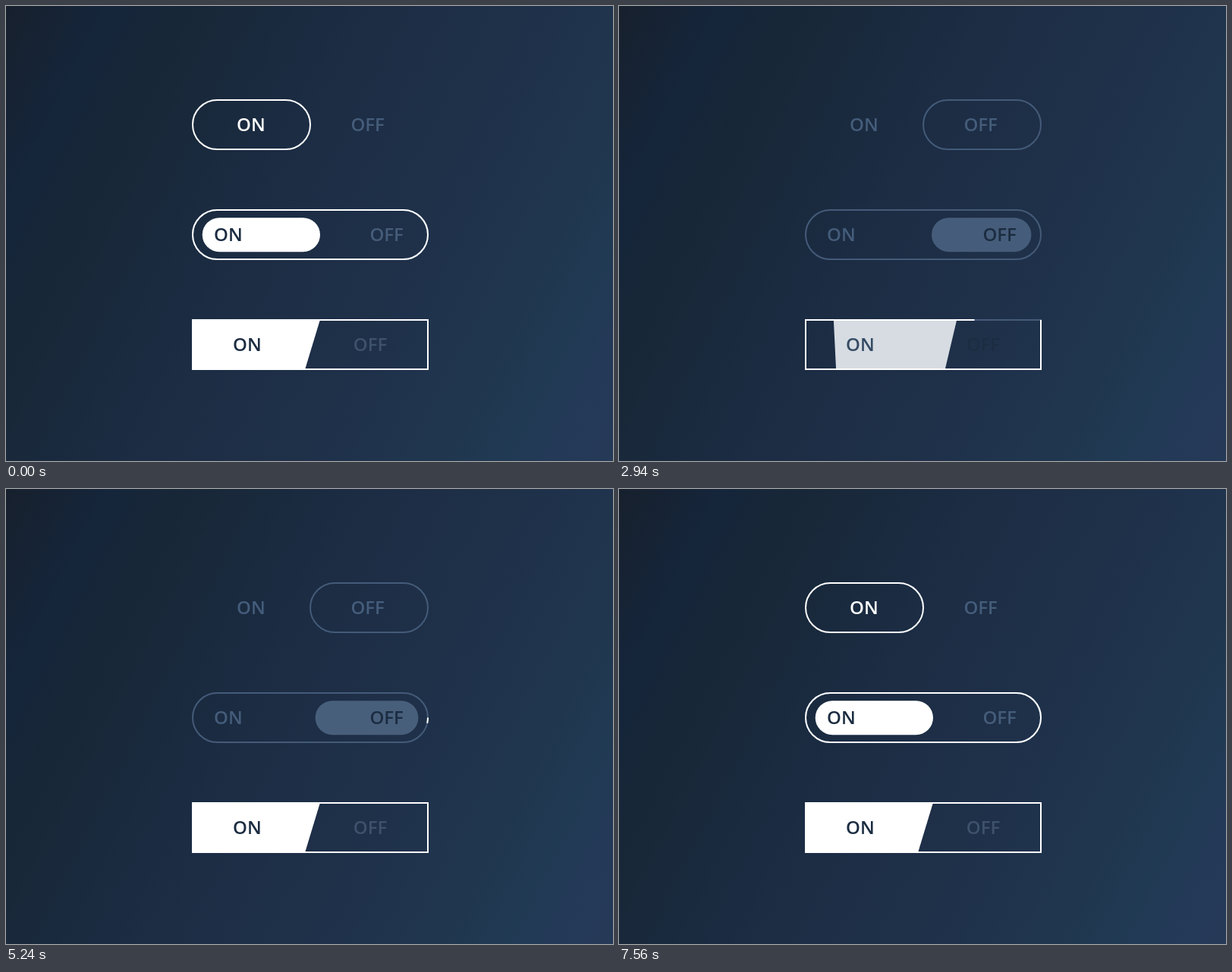
An HTML page for the animation above (7.62 s loop, 800 by 600 pixels).

```html
<!DOCTYPE html>
<html lang="en">
<head>
<meta charset="utf-8">
<title>Toggles</title>
<style>
  html, body { margin: 0; width: 100%; height: 100%; overflow: hidden; }
  body {
    background: linear-gradient(116.6deg, #17202d 0%, #15253a 12%, #182737 22%,
      #1b2c43 42%, #1f3049 62%, #20364f 80%, #213a53 87%, #233957 92%, #263a58 100%);
  }
  svg { display: block; width: 800px; height: 600px; }
  .ring { fill: none; stroke-width: 2; }
  .dim { stroke: #445b79; }
  .lit { stroke: #fff; }
  text { font: 600 24px "Open Sans", "Noto Sans", sans-serif; text-anchor: middle; }
</style>
</head>
<body>
<svg id="stage" viewBox="0 0 800 600"></svg>
<script>
const LOOP = 7620;
const WHITE = [255, 255, 255], DIM = [69, 93, 122], DARK = [27, 44, 65], FAINT = [62, 82, 109];
const stage = document.getElementById('stage');

function add(tag, attrs, content) {
  const node = document.createElementNS('http://www.w3.org/2000/svg', tag);
  for (const key in attrs) node.setAttribute(key, attrs[key]);
  if (content) node.textContent = content;
  return stage.appendChild(node);
}

function bezier(x1, y1, x2, y2) {
  const at = (a, b, u) => 3 * (1 - u) * (1 - u) * u * a + 3 * (1 - u) * u * u * b + u * u * u;
  return x => {
    if (x <= 0) return 0;
    if (x >= 1) return 1;
    let lo = 0, hi = 1;
    for (let i = 0; i < 24; i++) {
      const mid = (lo + hi) / 2;
      if (at(x1, x2, mid) < x) lo = mid; else hi = mid;
    }
    return at(y1, y2, lo);
  };
}

const soft = bezier(.33, 0, .3, 1);
const even = bezier(.33, 0, .67, 1);
const quick = bezier(.2, 0, .2, 1);
const burst = bezier(.05, .35, .3, 1);

// Each track goes 0 -> 1 (off), then back to 0 (on): start, duration, easing.
const tracks = {
  ring1:  [[400, 1090, soft], [6330, 1230, even]],
  on1:    [[420, 800, soft], [6400, 900, even]],
  ring2:  [[1715, 1110, soft], [5194, 837, soft]],
  right2: [[1502, 1110, soft], [5400, 517, soft]],
  left2:  [[1970, 740, soft], [5194, 520, soft]],
  fill2:  [[1627, 1110, soft], [5194, 700, soft]],
  on2:    [[1520, 560, soft], [5300, 450, soft]],
  off2:   [[1950, 720, soft], [5230, 450, soft]],
  ring3:  [[2747, 1126, soft], [4210, 950, quick]],
  move3:  [[2745, 850, soft], [4210, 950, burst]],
  fill3:  [[2745, 850, soft], [4210, 900, quick]],
  on3:    [[2730, 500, soft], [4210, 230, soft]],
  off3:   [[2640, 360, soft], [4210, 345, soft]]
};

const value = (name, t) => {
  const [a, b] = tracks[name].map(([start, dur, ease]) => ease((t - start) / dur));
  return a - b;
};
const mix = (a, b, p) => a + (b - a) * p;
const color = (a, b, p) => `rgb(${a.map((v, i) => Math.round(mix(v, b[i], p)))})`;

function capsule(x, y, w) {
  const r = 32.5;
  return `M${x + w} ${y + r}a${r} ${r} 0 0 1 ${-r} ${r}h${2 * r - w}` +
    `a${r} ${r} 0 0 1 0 ${-2 * r}h${w - 2 * r}a${r} ${r} 0 0 1 ${r} ${r}z`;
}

const ring = (d, kind) => add('path', { d, class: 'ring ' + kind, pathLength: 1 });

function trim(node, from, to) {
  const len = to - from;
  node.style.visibility = len > .0005 ? 'visible' : 'hidden';
  if (len > .9995) node.removeAttribute('stroke-dasharray');
  else node.setAttribute('stroke-dasharray', `0 ${from} ${len} 2`);
}

const label = (word, x, y, c) => add('text', { x, y, fill: color(c, c, 0) }, word);

const wide = capsule(246, 269, 310);
const box = 'M556 414v65h-310v-65z';

const left1 = ring(capsule(246, 124, 155), 'lit');
const right1 = ring(capsule(401, 124, 155), 'dim');
const on1 = label('ON', 322.9, 164.6, WHITE);
label('OFF', 476.6, 164.6, DIM);

ring(wide, 'dim');
const ring2 = ring(wide, 'lit');
const pill = add('rect', { y: 279.2, height: 45, rx: 22.5 });
const on2 = label('ON', 292.9, 309.6, DARK);
const off2 = label('OFF', 501.6, 309.6, DIM);

const slab = add('polygon', {});
ring(box, 'dim');
const ring3 = ring(box, 'lit');
const on3 = label('ON', 317.9, 454.6, DARK);
const off3 = label('OFF', 480, 454.6, FAINT);

function draw(t) {
  const v = name => value(name, t);
  const paint = (node, a, b, name) => node.setAttribute('fill', color(a, b, v(name)));

  trim(left1, v('ring1'), 1);
  trim(right1, 0, v('ring1'));
  paint(on1, WHITE, DIM, 'on1');

  trim(ring2, 0, 1 - v('ring2'));
  const x = mix(258.7, 412, v('left2'));
  pill.setAttribute('x', x);
  pill.setAttribute('width', mix(414, 543.4, v('right2')) - x);
  paint(pill, WHITE, DIM, 'fill2');
  paint(on2, DARK, DIM, 'on2');
  paint(off2, DIM, DARK, 'off2');

  trim(ring3, 0, 1 - v('ring3'));
  const p = v('move3');
  slab.setAttribute('points',
    `${mix(245, 418, p)},413.5 ${mix(414, 557, p)},413.5 ` +
    `${mix(394, 557, p)},479.5 ${mix(245, 433, p)},479.5`);
  paint(slab, WHITE, DIM, 'fill3');
  paint(on3, DARK, DIM, 'on3');
  paint(off3, FAINT, DARK, 'off3');
}

function tick() {
  draw(performance.now() % LOOP);
  requestAnimationFrame(tick);
}
tick();
</script>
</body>
</html>
```
